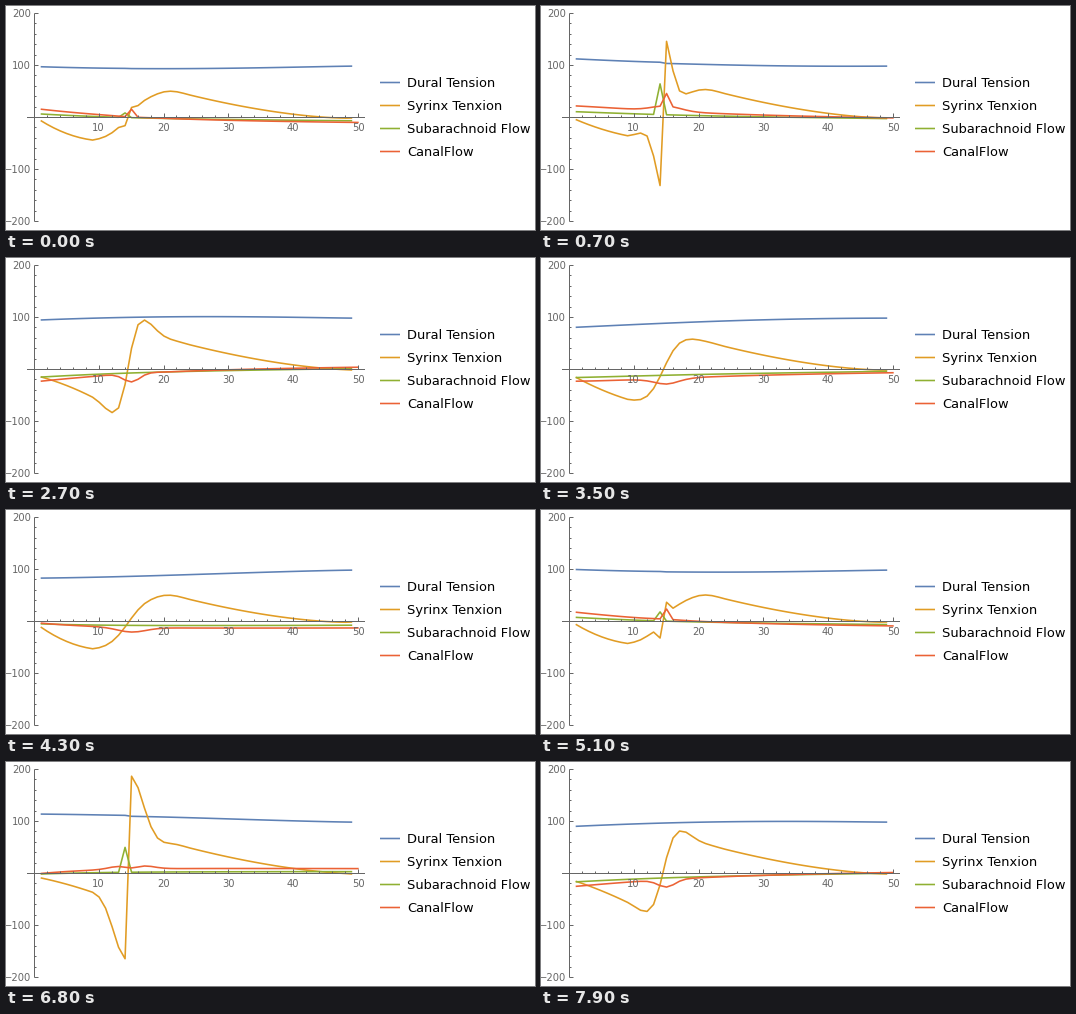
A matplotlib script that plays this animation: 529x224 px, repeating every 8 s.

```python
import matplotlib.pyplot as plt
import numpy as np
from matplotlib.animation import FuncAnimation
from matplotlib.patches import Rectangle

W, H, DPI = 529, 224, 100
FRAMES, STEP, PERIOD = 80, 0.1, 5.0
OMEGA = 2 * np.pi / PERIOD
GRAY = "#666666"
SERIES = [("Dural Tension", "#5E81B5"), ("Syrinx Tenxion", "#E19C24"),
          ("Subarachnoid Flow", "#8FB032"), ("CanalFlow", "#EB6235")]
XS = np.arange(1, 50)
CANAL_XS = np.arange(1, 51)
BLOCK = 14.5


def wave(t, mean, amp, peak):
    return mean + amp * np.cos(OMEGA * (t - peak))


def bell(x, center, width):
    return np.exp(-0.5 * ((x - center) / width) ** 2)


def kick(t):
    """Strength of the valve opening, zero while it is closed."""
    return max(0, np.sin(OMEGA * (t + 0.1)))


def dural(t):
    u, d = (XS - 1) / 48, XS - BLOCK
    base = wave(t, 98.8, 19 * (1 - u) ** 1.2, 1.3 + 0.85 * u)
    return base - 1.2 * kick(t) * np.sign(d) * np.exp(-abs(d) / 6)


def subarachnoid(t):
    u = (XS - 1) / 48
    base = wave(t, u - 2.8, 5.5 + 8.5 * (1 - u) ** 3, 0.65 + 1.35 * u)
    return base + 70 * kick(t) * (XS == 14)


def canal(t):
    x = CANAL_XS
    v = (x - 1) / 49
    base = wave(t, -1.5, 11 + 13 * (1 - v) ** 3, 0.6 + 1.9 * v - 0.6 * v * v)
    hump = wave(t, 2.5, 12.5, 1.45) * bell(x, 15, 2.2)
    dip = -21 * bell(t, 2.4, 0.55) * bell(x, 15, 1.3)
    spike = 30 * bell(t, 0.45, 0.38) * (x == 15)
    return base + hump + dip + spike


def syrinx_core(t):
    """Odd step at the blockage plus a pulse that widens and softens with age."""
    age, d = t + 0.07, XS - BLOCK
    step = wave(t, 48, -3, 1.4) * np.tanh(d / 3.3)
    pulse = 217 * age * np.exp(-0.5 * (age / 1.435) ** 2) * bell(d, 0, 0.5 + 0.85 * age)
    soft = max(0.05, 1.75 * (age - 1.85))
    return wave(t, 4.8, 7, 1.6) + step + pulse * np.tanh(d / soft)


def syrinx(t):
    core = syrinx_core(t)
    q = (49 - XS) / 27
    tail = wave(t, 53 * q ** 1.65 - 1, 3.5 * np.sqrt(q), 1.9)
    s = np.clip((XS - 18) / 6, 0, 1)
    y = core + (tail - core) * s * s * (3 - 2 * s)
    # A parabola leads from the left end into the core at x = 9
    start, mid = wave(t, -9.5, 5.7, 0.7), wave(t, -29.5, 10.5, 1.35)
    head = np.polyfit([1, 5, 9], [start, mid, core[8]], 2)
    return np.where(XS < 9, np.polyval(head, XS), y)


def px(x):
    return 28.2 + 6.49 * x


def py(y):
    return 111.5 - 0.52 * y


def pt(pixels):
    return pixels * 72 / DPI


def mid_pixel(v):
    return np.floor(v) + 0.5


fig = plt.figure(figsize=(W / DPI, H / DPI), dpi=DPI, facecolor="white")
ax = fig.add_axes([0, 0, 1, 1])
ax.set(xlim=(0, W), ylim=(H, 0))
ax.axis("off")


def stroke(xs, ys, color, width, z=2):
    return ax.plot(xs, ys, color=color, lw=pt(width), zorder=z, snap=False,
                   solid_capstyle="butt")[0]


def label(x, y, text, size, color, ha):
    ax.text(x, y, text, fontsize=pt(size), color=color, ha=ha, va="baseline",
            family="DejaVu Sans", zorder=6)


left, base = mid_pixel(px(0)), py(0)
stroke([21, 359], [base] * 2, GRAY, 1, 5)
stroke([left] * 2, [py(200), py(-200)], GRAY, 1, 5)
for v in range(2, 51, 2):
    major = v % 10 == 0
    stroke([mid_pixel(px(v))] * 2, [base, base - (4 if major else 2)], GRAY, 1, 5)
    if major:
        label(px(v) - 0.6, 125, str(v), 10, GRAY, "center")
for v in range(-200, 201, 20):
    major = v % 100 == 0
    stroke([left, left + (4 if major else 2)], [mid_pixel(py(v))] * 2, GRAY, 1, 5)
    if v and major:
        label(25, py(v) + 3.6, str(v).replace("-", "\u2212"), 10, GRAY, "right")

window = Rectangle((21, py(200)), 338, py(-200) - py(200), transform=ax.transData)
lines = []
for i, (name, color) in enumerate(SERIES):
    y = 76.5 + 23 * i
    stroke([374, 394], [y, y], color, 1.6)
    label(401, y + 4.5, name, 13, "black", "left")
    line = stroke([], [], color, 1.6)
    line.set_clip_path(window)
    lines.append(line)


def update(i):
    t = i * STEP % PERIOD
    curves = [(XS, dural(t)), (XS, syrinx(t)), (XS, subarachnoid(t)),
              (CANAL_XS, canal(t))]
    for line, (x, y) in zip(lines, curves):
        line.set_data(px(x), py(y))
    return lines


anim = FuncAnimation(fig, update, frames=FRAMES, interval=1000 * STEP, repeat=True)
plt.show()
```
